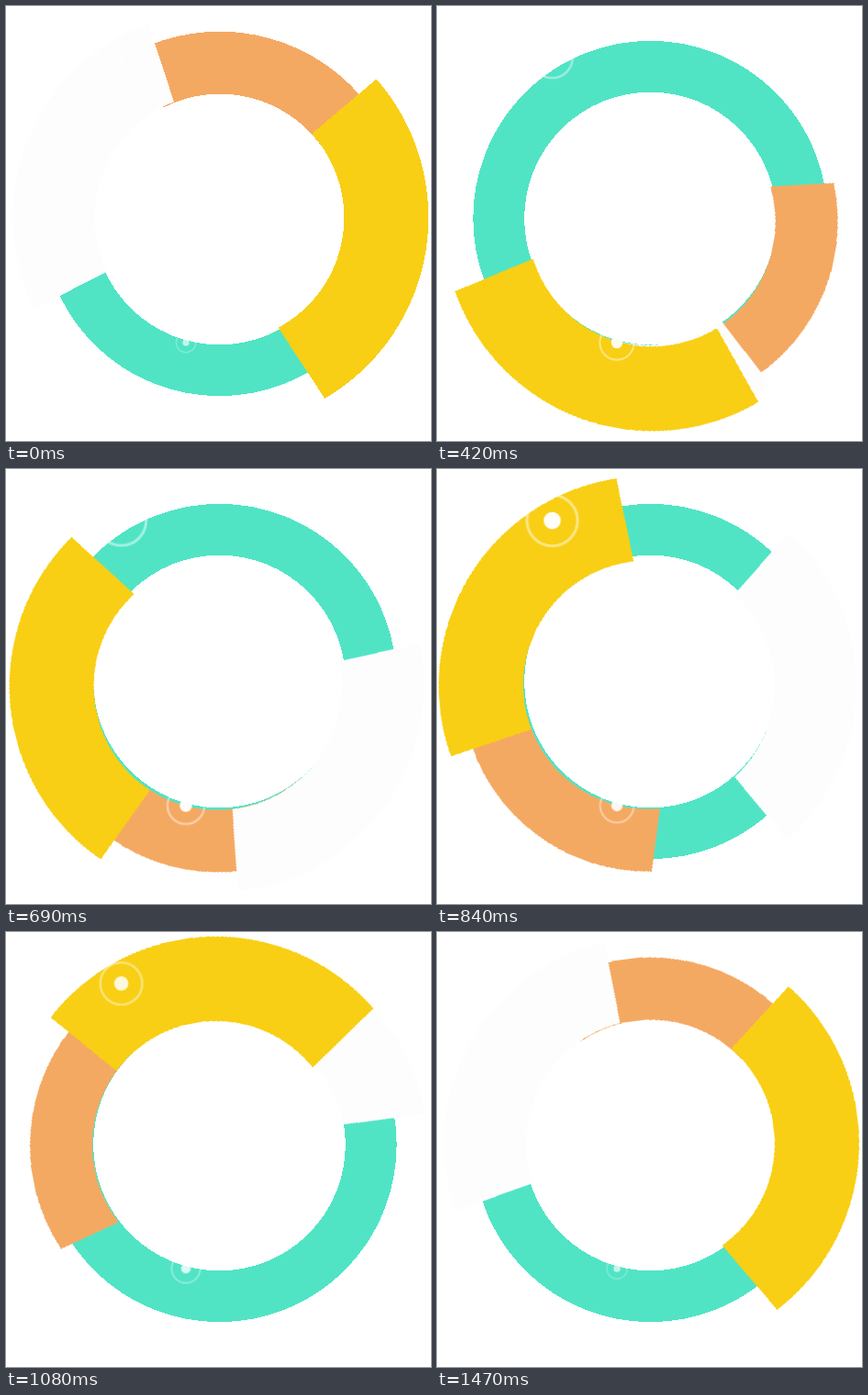
Write an HTML page that moves like this. It is 463x473 px and loops after 1.5 s.

```html
<!DOCTYPE html>
<html lang="en">
<head>
<meta charset="utf-8">
<title>Ring chart</title>
<style>
  html, body { margin: 0; width: 100%; height: 100%; overflow: hidden; background: #fff; }
  svg { display: block; width: 100%; height: 100%; }

  .track, .spin { shape-rendering: crispEdges; }
  .track { fill: none; stroke: #50e4c5; stroke-width: 55.8; }
  .orange { fill: #f4a962; }
  .pale { fill: #fdfdfd; }
  .yellow { fill: #f8cf14; }

  .spin { transform-origin: 231.6px 233px; animation: spin 1.5s steps(50) infinite; }
  .back { animation-name: spin-back; }
  @keyframes spin { to { transform: rotate(360deg); } }
  @keyframes spin-back { to { transform: rotate(-360deg); } }

  .dot { fill: #fff; }
  .halo { fill: none; stroke: #fff; stroke-width: 1.1; opacity: .5; }
  .low { animation: pulse-low 1.5s infinite; }
  .high { animation: pulse-high 1.5s infinite; }
  @keyframes pulse-low {
    0%, 100% { transform: scale(1.1); opacity: .65; animation-timing-function: steps(19); }
    38% { transform: scale(2.2); opacity: 1; animation-timing-function: steps(31); }
  }
  @keyframes pulse-high {
    0%, 100% { transform: scale(1.5); opacity: .65; animation-timing-function: steps(26); }
    52% { transform: scale(2.95); opacity: 1; animation-timing-function: steps(24); }
  }
</style>
</head>
<body>
<svg viewBox="0 0 463 473">
  <defs>
    <g id="beacon">
      <circle class="dot" r="3.3"/>
      <circle class="halo" r="9.75"/>
    </g>
  </defs>

  <circle class="track" cx="232.5" cy="231" r="165.25"/>
  <path class="orange spin" d="M154.2 43.5A203.3 203.3 0 0 1 397.2 111.5L342.7 151A136 136 0 0 0 170.9 110.7Z"/>
  <path class="pale spin back" d="M30.5 329.5A224.3 224.3 0 0 1 154.8 19.3L183 104A135 135 0 0 0 110 288.8Z"/>
  <path class="yellow spin" d="M403.6 79.5A227.9 227.9 0 0 1 347.3 426.8L296.5 349.8A135.5 135.5 0 0 0 333.1 139Z"/>

  <g transform="translate(196 366)"><use class="low" href="#beacon"/></g>
  <g transform="translate(125.5 56)"><use class="high" href="#beacon"/></g>
</svg>
</body>
</html>
```
